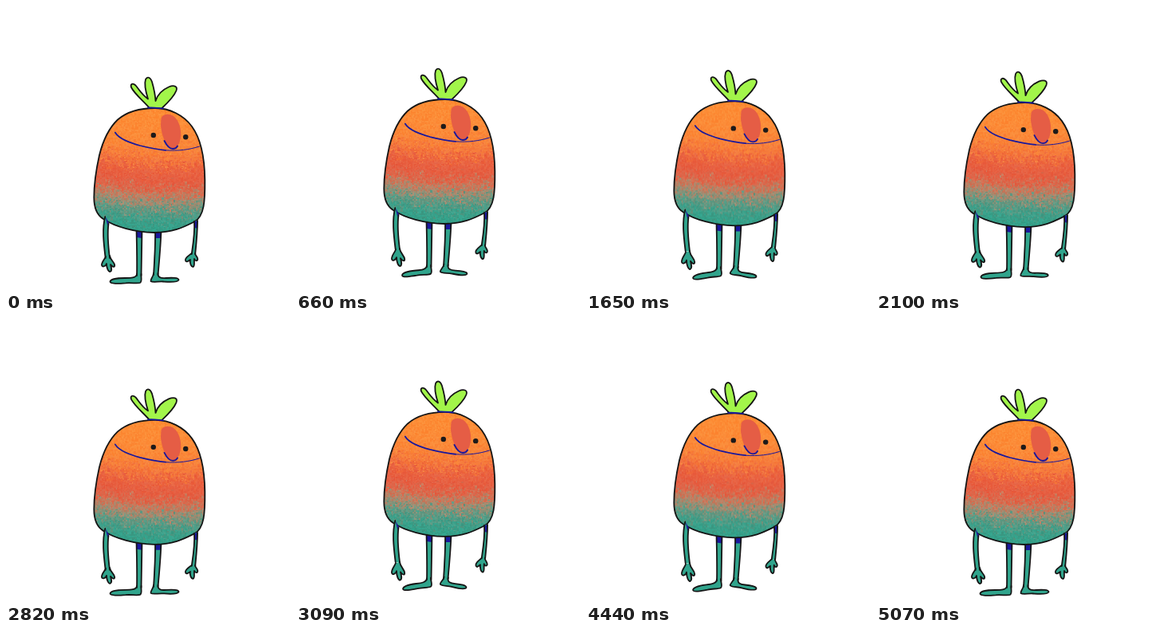
These frames come from a looping animation (356 by 356 pixels, 5430 ms). An HTML page with a canvas:

```html
<!DOCTYPE html>
<html lang="en">
<head>
<meta charset="utf-8">
<title>Hopping fellow</title>
<style>
html, body { margin: 0; width: 100%; height: 100%; overflow: hidden; background: #fff; }
canvas { display: block; width: 100%; height: 100%; }
</style>
</head>
<body>
<canvas id="stage" width="356" height="356"></canvas>
<script>
const ctx = document.getElementById('stage').getContext('2d');

const LOOP = 5430, STEP = 30;
const STARTS = [0, 1380, 2790, 4170];
const RISE = 520, HOP = 885, HEIGHT = 16.2;
const INK = '#151515', TEAL = '#30a48c', BLUE = '#1a189c', LIME = '#a2f54a', CORAL = '#e55d45';

const P = d => new Path2D(d);

const shape = {
  body: P('M187 128 C205 128 223 137 233 151 C244 166 249 192 249.3 218 C249.5 243 249 264 236 270.500 C223 277 210 284 186 284 C162 283.500 137 277 122 267 C112 261 110.300 250 110.300 240 C110.300 225 113 205 117 187 C121 171 129 153 140 142.500 C151 133 168 128 187 128 Z'),
  leaves: P('M179.500 127.500 C172 119 161 110 157 102 C155.500 97.500 159 96.300 162.500 99.500 C167 105 170 111 178 116.500 C175 107 173 98 175 92 C177 88 181 89 183 95 C185 102 187 110 187.500 119 C190 111 196 105 204 101.500 C210 99 215.500 100 213.500 106 C210.500 114 203 121 195.500 128'),
  nose: P('M194.500 141 C196 136 202 135 207 136.500 C214 139 218 148 219 157 C220 168 216 178.500 209 178.500 C201 178 195 163 194 149 Z'),
  noseTip: P('M198.500 169 C201.500 175 205 179 209 179 C212 179 214 177.500 215 175.500'),
  smile: P('M136.800 158.500 C142 167 156 171.500 168 175 C180 178 190 180 200 180.800'),
  smileEnd: P('M200 180.800 C216 182 230 180 242.500 176'),
  crown: P('M178 127.500 C184 126.800 191 128 197 128.500')
};

// Limbs: an open upper part, and an open end part that turns about a pivot.
const legs = [
  { upper: P('M163.500 280 C164 300 164.500 322 164 338 M169.500 338 C169.700 320 170 300 170.500 280'),
    fill: P('M163.500 280 L164 338 L169.500 338 L170.500 280 Z'),
    hip: P('M163.600 281 L170.400 281 L170 291 L163.900 290 Z'),
    end: P('M164 336 C163.500 341 156 341 149 341 C140 341 131 342.500 130.500 345.500 C130.500 348.500 141 348 150 347.300 C157 346.500 164 348.300 168 347 C171 345.500 169 341 169.500 336'),
    pivot: [167, 339], turn: -7, scale: [-.07, 0] },
  { upper: P('M187 280 C187.500 300 186 322 185 337 M190.500 337 C192 320 194 300 194.500 280'),
    fill: P('M187 280 L185 337 L190.500 337 L194.500 280 Z'),
    hip: P('M187.300 281 L194.300 281 L193.800 291 L187.300 291 Z'),
    end: P('M185 335 C184.500 340 180.500 343 181.500 345 C184 347 191 345 197 345.500 C204 346 215 347 216.500 343.500 C217 340.500 208 340.500 201 341 C195 341.500 190 341 190.500 335'),
    pivot: [188, 338], turn: 10, scale: [-.06, 0] }
];

const arms = [
  { upper: P('M124.300 264 C120 280 122.800 300 124.700 316 M130 316 C128 300 126.500 287 128.500 273'),
    fill: P('M124.300 264 C120 280 122.800 300 124.700 316 L130 316 C128 300 126.500 287 128.500 273 Z'),
    hip: P('M124.600 264 L129 272 L127.500 276 Z'),
    end: P('M125 314 C123.500 318 119.500 321 120 325 C121 328 125 326 126 323 C126 328 128 333 130.500 333 C133.500 332 132 328 131 324 C133 327 136.500 328 136.200 325 C136 321 131 319 130 313'),
    pivot: [126, 314], scale: [0, .14], drop: 3 },
  { upper: P('M236 270 C237 284 234.500 299 232.700 311 M237.200 311 C238.500 298 240 284 240 269'),
    fill: P('M236 270 C237 284 234.500 299 232.700 311 L237.200 311 C238.500 298 240 284 240 269 Z'),
    hip: P('M236.300 270 L240.300 269 L240 279 L236.600 278 Z'),
    end: P('M232.700 310 C229 313 224 315.500 225 319 C226 322 229 319.500 231 318 C230 322 232 327 234.500 327 C237 326 235.500 321 236 317 C237 320 240.500 320 240.300 317 C240 314 237 313 237.200 310'),
    pivot: [232, 310], scale: [-.07, .04], drop: 1 }
];

// Grainy body colour, made once: distance from the top, then red, green, blue.
const RAMP = [
  [0, 253, 141, 52], [45, 251, 137, 56], [64, 245, 121, 60], [78, 234, 98, 64],
  [96, 228, 93, 66], [106, 210, 115, 85], [117, 165, 140, 113],
  [129, 100, 152, 130], [142, 60, 158, 136], [165, 45, 162, 138]
];

function rampAt(y) {
  y = Math.max(0, Math.min(164, y));
  const i = RAMP.findIndex(s => s[0] > y);
  const a = RAMP[i - 1], b = RAMP[i];
  const k = (y - a[0]) / (b[0] - a[0]);
  return [1, 2, 3].map(c => a[c] + (b[c] - a[c]) * k);
}

function makeGrain(w, h) {
  const cv = document.createElement('canvas');
  cv.width = w;
  cv.height = h;
  const g = cv.getContext('2d');
  let seed = 7;
  const rnd = () => (seed = (seed * 16807) % 2147483647) / 2147483647;

  function fleck(x, y, fw, fh, spread) {
    const off = x / w * 2 - 1;
    const jitter = (rnd() + rnd() - 1) * spread;
    const light = (rnd() - .5) * 18;
    const [r, gr, b] = rampAt(y + off * off * 7 - off * 4 + jitter);
    g.fillStyle = `rgb(${Math.round(r)},${Math.round(gr + light)},${Math.round(b + light)})`;
    g.fillRect(x, y, fw, fh);
  }

  for (let y = 0; y < h; y += 2)
    for (let x = 0; x < w; x += 2) fleck(x, y, 2, 2, 10);
  for (let i = 0; i < 2600; i++)
    fleck(Math.floor(rnd() * w), Math.floor(rnd() * h), 1 + Math.floor(rnd() * 3), 1 + Math.floor(rnd() * 3), 18);
  return cv;
}
const grain = makeGrain(144, 160);

const smooth = (a, b, t) => {
  const k = Math.max(0, Math.min(1, (t - a) / (b - a)));
  return (1 - Math.cos(Math.PI * k)) / 2;
};

function pose(time) {
  const now = Math.floor((time % LOOP) / STEP) * STEP;
  const t = now - STARTS.filter(s => s <= now).pop();
  return {
    lift: HEIGHT * smooth(0, RISE, t) * (1 - smooth(RISE, HOP, t)),
    air: smooth(60, 270, t) * (1 - smooth(590, 790, t))
  };
}

function line(path, color = INK, width = 1.8) {
  ctx.strokeStyle = color;
  ctx.lineWidth = width;
  ctx.stroke(path);
}

function paint(path, color) {
  ctx.fillStyle = color;
  ctx.fill(path);
}

function limb(part, air) {
  const [px, py] = part.pivot;
  const [sx, sy] = part.scale;
  const m = new DOMMatrix()
    .translate(px, py + (part.drop || 0) * air)
    .rotate((part.turn || 0) * air)
    .scale(1 + sx * air, 1 + sy * air)
    .translate(-px, -py);
  const end = new Path2D();
  end.addPath(part.end, m);
  paint(part.fill, TEAL);
  paint(end, TEAL);
  paint(part.hip, BLUE);
  line(part.upper);
  line(end);
}

function dot(x, y) {
  ctx.fillStyle = '#1d1a1a';
  ctx.beginPath();
  ctx.arc(x, y, 3.2, 0, Math.PI * 2);
  ctx.fill();
}

function draw(time) {
  const { lift, air } = pose(time);
  ctx.setTransform(1, 0, 0, 1, 0, 0);
  ctx.fillStyle = '#fff';
  ctx.fillRect(0, 0, 356, 356);
  ctx.translate(0, -lift);
  ctx.lineCap = ctx.lineJoin = 'round';

  legs.forEach(l => limb(l, air));
  paint(shape.leaves, LIME);
  line(shape.leaves);

  ctx.save();
  ctx.clip(shape.body);
  ctx.drawImage(grain, 108, 127);
  ctx.restore();
  line(shape.body);
  line(shape.crown, BLUE);

  line(shape.smile, BLUE);
  line(shape.smileEnd, BLUE, 1);
  paint(shape.nose, CORAL);
  line(shape.noseTip, BLUE, 1.9);
  dot(184.8, 162);
  dot(225.2, 164.2);

  arms.forEach(a => limb(a, air));
}

const begin = performance.now();
function tick() {
  draw(performance.now() - begin);
  requestAnimationFrame(tick);
}
tick();
</script>
</body>
</html>
```
